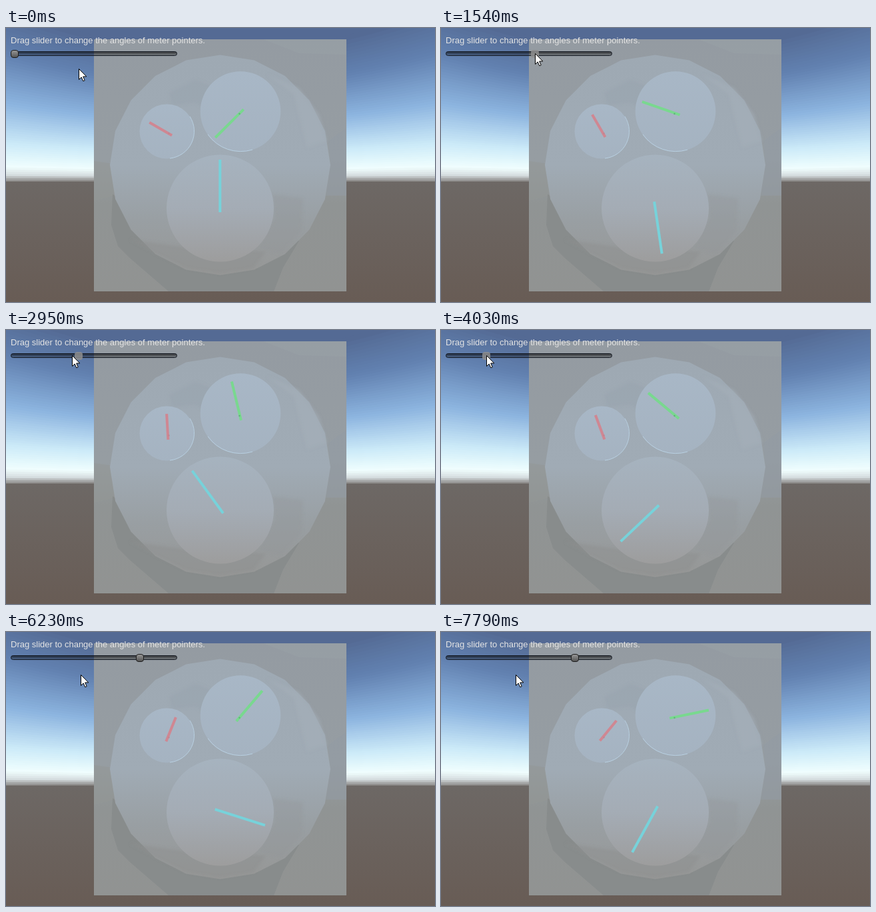
Write an HTML page that moves like this. It is 644 by 412 pixels and loops after 7.93 s.

```html
<!DOCTYPE html>
<html lang="en">
<head>
<meta charset="utf-8">
<title>Meter pointers</title>
<style>
html, body { margin: 0; width: 100%; height: 100%; overflow: hidden; background: #685c55; }
svg { display: block; width: 644px; height: 412px; }
text { font: 13px "Liberation Sans", Arial, sans-serif; fill: #e4e4e4; }
</style>
</head>
<body>
<svg viewBox="0 0 644 412">
  <defs>
    <linearGradient id="ground" x2="0" y2="1">
      <stop offset="0" stop-color="#6d6865"/>
      <stop offset="1" stop-color="#685c55"/>
    </linearGradient>
    <linearGradient id="plate" x2="0" y2="1">
      <stop offset="0" stop-color="#949ba2"/>
      <stop offset=".48" stop-color="#969da2"/>
      <stop offset=".65" stop-color="#909494"/>
      <stop offset="1" stop-color="#919392"/>
    </linearGradient>
    <linearGradient id="dial" x2="0" y2="1">
      <stop offset="0" stop-color="#9ea9b3"/>
      <stop offset=".5" stop-color="#a0abb5"/>
      <stop offset=".75" stop-color="#999fa3"/>
      <stop offset="1" stop-color="#969796"/>
    </linearGradient>
    <linearGradient id="small" x2="0" y2="1">
      <stop offset="0" stop-color="#a8b7c6"/>
      <stop offset="1" stop-color="#a5b3c1"/>
    </linearGradient>
    <linearGradient id="large" x2="0" y2="1">
      <stop offset="0" stop-color="#a6b3bf"/>
      <stop offset=".5" stop-color="#a4acb5"/>
      <stop offset="1" stop-color="#9d9d9d"/>
    </linearGradient>
    <linearGradient id="knob" x2="0" y2="1">
      <stop offset="0" stop-color="#9a9a9a"/>
      <stop offset="1" stop-color="#525252"/>
    </linearGradient>
    <linearGradient id="groove" x2="0" y2="1">
      <stop offset="0" stop-opacity=".65"/>
      <stop offset="1" stop-opacity=".2"/>
    </linearGradient>
    <clipPath id="plateClip"><rect x="132" y="17" width="379" height="379"/></clipPath>
    <filter id="soft"><feGaussianBlur stdDeviation="2"/></filter>
  </defs>

  <g id="sky"></g>
  <rect y="231" width="644" height="181" fill="url(#ground)"/>

  <rect x="132" y="17" width="379" height="379" fill="url(#plate)"/>
  <g clip-path="url(#plateClip)">
    <path d="M384 16H511V40L440 38Z" fill="#9aa2a8" opacity=".4"/>
    <path d="M487 206L480 252H511V150L484 170Z" fill="#939ca4" opacity=".6"/>
    <path d="M132 200L160 204L170 250L132 260Z" fill="#949896" opacity=".5"/>
    <path d="M160 250L158 296L168 328L186 346L244 396H402L416 360L440 320L300 330Z" fill="#888c8c"/>
  </g>
  <polygon id="face" fill="url(#dial)"/>
  <g filter="url(#soft)">
    <path d="M245 98L285 78L310 88L296 120L284 112L250 116Z" fill="#97a3ae" opacity=".5"/>
    <path d="M392 70L432 100L452 180L482 170L470 130L440 90Z" fill="#a5b0ba" opacity=".5"/>
    <path d="M400 250L446 256L444 305L412 340L380 330L404 285Z" fill="#929697" opacity=".3"/>
    <path d="M186 318L270 330L390 336L372 361L321 369L270 361L222 338Z" fill="#8e908f" opacity=".5"/>
  </g>

  <circle cx="241.5" cy="155.5" r="41" fill="url(#small)"/>
  <circle cx="352" cy="125.5" r="60.3" fill="url(#small)"/>
  <circle cx="321.5" cy="271" r="80.5" fill="url(#large)"/>
  <g fill="none" stroke="#bcd5e7" opacity=".85">
    <path d="M303 160A60.3 60.3 0 0 0 370 183"/>
    <path d="M276 133A41 41 0 0 1 246 196"/>
  </g>

  <g stroke-width="4">
    <line id="red" x1="243" y1="165" x2="243" y2="126" stroke="#cf8792"/>
    <line id="green" x1="351" y1="136" x2="351" y2="76" stroke="#79d88f"/>
    <line id="cyan" x1="321.3" y1="277" x2="321.3" y2="198" stroke="#77d2da"/>
  </g>
  <circle cx="350.5" cy="129" r="1.2" fill="#5fb078"/>
  <circle cx="244.5" cy="158.5" r="1.2" fill="#c08490"/>

  <text x="7" y="23">Drag slider to change the angles of meter pointers.</text>
  <rect x="7.5" y="35.5" width="249" height="6" rx="3" fill="url(#groove)" stroke="#141922"/>
  <g id="handle">
    <rect id="idle" x="-5.5" y="33.5" width="11" height="11" rx="3.5" fill="url(#knob)" stroke="#1b1b1b"/>
    <rect id="held" x="-6" y="33" width="12" height="12" rx="4" fill="#8e8e8e" opacity=".85"/>
  </g>
  <path id="cursor" d="M.5 .5V16.5L4.2 13L6.8 18.8L9.2 17.8L6.7 12H11.8Z" fill="#fff" stroke="#000"/>
</svg>
<script>
const LOOP = 7930, STEP = 73.47, DRAG_START = 810;
const RATE = .87, MIN_SPEED = .088;  // how pointers follow the slider, per second
const DRAG_TIME = 320;
const DRAGS = [
  { time: 872, to: .538 },
  { time: 2955, to: .23 },
  { time: 4710, to: .79 },
];
const $ = id => document.getElementById(id);
const mix = (a, b, u) => a + (b - a) * u;
const smooth = u => {
  u = Math.min(1, Math.max(0, u));
  return u * u * (3 - 2 * u);
};

// Exponential approach that ends at a constant slow speed
function follow(from, to, seconds) {
  const gap = Math.abs(to - from), slowGap = Math.min(gap, MIN_SPEED / RATE);
  const slowAt = Math.log(gap / slowGap) / RATE;
  const left = seconds < slowAt
    ? gap * Math.exp(-RATE * seconds)
    : Math.max(0, slowGap - MIN_SPEED * (seconds - slowAt));
  return to - Math.sign(to - from) * left;
}

function pointerValue(t) {
  let value = 0;
  DRAGS.forEach(({ time, to }, i) => {
    const end = Math.min(t, DRAGS[i + 1]?.time ?? LOOP);
    if (end > time) value = follow(value, to, (end - time) / 1000);
  });
  return value;
}

function handleX(t) {
  const value = DRAGS.reduce((v, d) => mix(v, d.to, smooth((t - d.time) / DRAG_TIME + .5)), 0);
  return 13 + 238 * value;
}

function cursorAt(t) {
  const reach = smooth(t / 500), leave = smooth((t - 5130) / 570);
  const x = mix(109, handleX(t + 30), reach), y = mix(61, 38, reach);
  return [mix(x, 112, leave), mix(y, 64, Math.sin(leave * Math.PI / 2))].map(Math.round);
}

// Sky bands of equal elevation are hyperbolas in a flat perspective view
function buildSky() {
  const horizon = 226, focal = 357, bands = 64, top = 190;
  const stops = [[190, 84, 106, 148], [140, 98, 129, 176], [85, 140, 180, 223],
    [40, 204, 234, 248], [14, 240, 254, 254], [5, 214, 222, 224], [-5, 112, 107, 104]];
  const colour = h => {
    const n = Math.max(1, stops.findIndex(s => s[0] <= h));
    const a = stops[n - 1], b = stops[n], u = (a[0] - h) / (a[0] - b[0]);
    return `rgb(${[1, 2, 3].map(c => Math.round(mix(a[c], b[c], u)))})`;
  };
  let paths = `<rect width="644" height="412" fill="${colour(top)}"/>`;
  for (let i = 0; i <= bands; i++) {
    const h = mix(top, -5, Math.pow(i / bands, .8));
    const line = Array.from({ length: 15 }, (_, j) => {
      const x = j * 46;
      return `${x} ${(horizon - h * Math.hypot(1, (x - 322) / focal)).toFixed(1)}`;
    });
    paths += `<path d="M${line.join("L")}V412H0Z" fill="${colour(h)}"/>`;
  }
  $("sky").innerHTML = paths;
}

function buildFace() {
  const corners = Array.from({ length: 20 }, (_, i) => {
    const a = i * Math.PI / 10;
    return [321.5 + 165.5 * Math.sin(a), 206 - 165.5 * Math.cos(a)];
  });
  $("face").setAttribute("points", corners.join(" "));
}

const transform = (id, value) => $(id).setAttribute("transform", value);

function draw(time) {
  // The scene refreshes at a fixed, slow rate
  const t = DRAG_START + STEP * Math.floor((time - DRAG_START + 25) / STEP);
  const v = pointerValue(t);
  transform("red", `rotate(${-60 + 126 * v} 243 158)`);
  transform("green", `rotate(${-135 + 270 * v} 351 128)`);
  transform("cyan", `rotate(${720 * v} 321.3 269)`);
  transform("handle", `translate(${Math.round(t < DRAG_START ? 13 : handleX(t))} 0)`);
  transform("cursor", `translate(${cursorAt(t)})`);
  const held = t >= DRAG_START && t < 5130;
  $("idle").style.display = held ? "none" : "";
  $("held").style.display = held ? "" : "none";
}

buildSky();
buildFace();
const start = performance.now();
function tick() {
  draw((performance.now() - start) % LOOP);
  requestAnimationFrame(tick);
}
tick();
</script>
</body>
</html>
```
